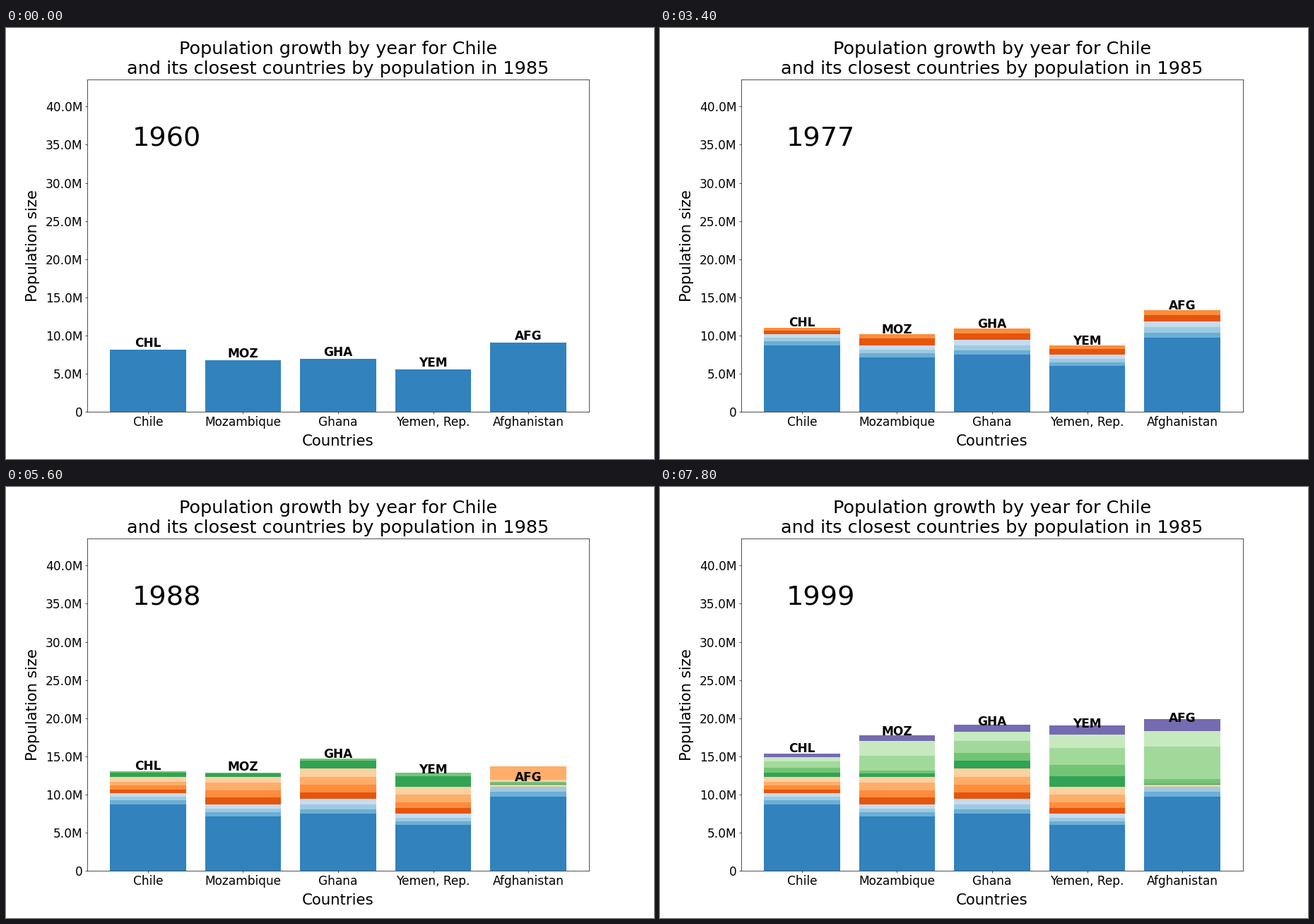
A matplotlib script for the animation above (8000 ms loop, 917x611 px).

```python
import numpy as np
import matplotlib.pyplot as plt
from matplotlib.animation import FuncAnimation
from matplotlib.ticker import FuncFormatter

K = 917 / 1500          # layout is designed on a 1500 px wide page
FIRST, COUNT, SPAN = 1960, 40, 62

plt.rcParams.update({
    "font.family": "DejaVu Sans",
    "axes.linewidth": 0.8 * K,
    "axes.labelpad": 10 * K,
    "axes.titlepad": 10 * K,
})
for axis in ("xtick", "ytick"):
    plt.rcParams.update({
        f"{axis}.major.size": 3.5 * K,
        f"{axis}.major.width": 0.8 * K,
        f"{axis}.major.pad": 3.5 * K,
        f"{axis}.labelsize": 20 * K,
    })

# Turning points of each curve: years after 1960 -> millions of people
COUNTRIES = {
    ("Chile", "CHL"): {0: 8.13, 6: 9.22, 21: 11.68, 33: 14.13, 39: 15.32},
    ("Mozambique", "MOZ"): {0: 6.69, 12: 8.70, 21: 11.59, 24: 12.33,
                            30: 13.10, 33: 14.06, 34: 15.06, 37: 16.96,
                            39: 17.74},
    ("Ghana", "GHA"): {0: 6.92, 12: 9.42, 24: 13.40, 39: 19.13},
    ("Yemen, Rep.", "YEM"): {0: 5.53, 12: 7.48, 18: 8.95, 24: 11.02,
                             33: 15.57, 39: 19.04},
    ("Afghanistan", "AFG"): {0: 9.04, 12: 11.85, 18: 13.61, 19: 13.66,
                             20: 13.17, 21: 11.94, 22: 10.99, 25: 11.43,
                             27: 11.39, 31: 12.24, 33: 14.94, 34: 16.25,
                             39: 19.89},
}


def grow(points):
    """Constant yearly growth rate between turning points."""
    return np.exp(np.interp(range(COUNT), list(points),
                            np.log(list(points.values()))))


names, codes = zip(*COUNTRIES)
slots = np.arange(len(names))
pop = np.array([grow(p) for p in COUNTRIES.values()]).T
# Every year's bar starts where the previous one ended
base = np.vstack([np.zeros(len(names)), pop[:-1]])
label_y = np.vstack([pop[:1], pop[:-1]])

fig, ax = plt.subplots(figsize=(9.17, 6.11), dpi=100)
cmap = plt.get_cmap("tab20c")
layers = [ax.bar(slots, pop[i] - base[i], 0.8, bottom=base[i],
                 color=cmap(i / SPAN)) for i in range(COUNT)]

ax.set_xlim(-0.64, 4.64)
ax.set_ylim(0, 43.5275)
ax.set_xticks(slots, names)
ax.set_yticks(range(0, 41, 5))
ax.yaxis.set_major_formatter(
    FuncFormatter(lambda v, _: f"{v:.1f}M" if v else "0"))
ax.set_xlabel("Countries", fontsize=25 * K)
ax.set_ylabel("Population size", fontsize=25 * K)
ax.set_title("Population growth by year for Chile\n"
             "and its closest countries by population in 1985",
             fontsize=30 * K)

year_text = ax.text(-0.166, 34.77, "", fontsize=45 * K)
tags = [ax.text(x, 0, code, fontsize=20 * K, weight="bold",
                ha="center", va="bottom") for x, code in zip(slots, codes)]


def draw(i):
    for n, layer in enumerate(layers):
        for bar in layer:
            bar.set_visible(n <= i)
    for tag, y in zip(tags, label_y[i]):
        tag.set_y(y)
    year_text.set_text(str(FIRST + i))
    return [year_text, *tags]


anim = FuncAnimation(fig, draw, frames=COUNT, interval=200, repeat=True,
                     repeat_delay=0, blit=False)
plt.show()
```
